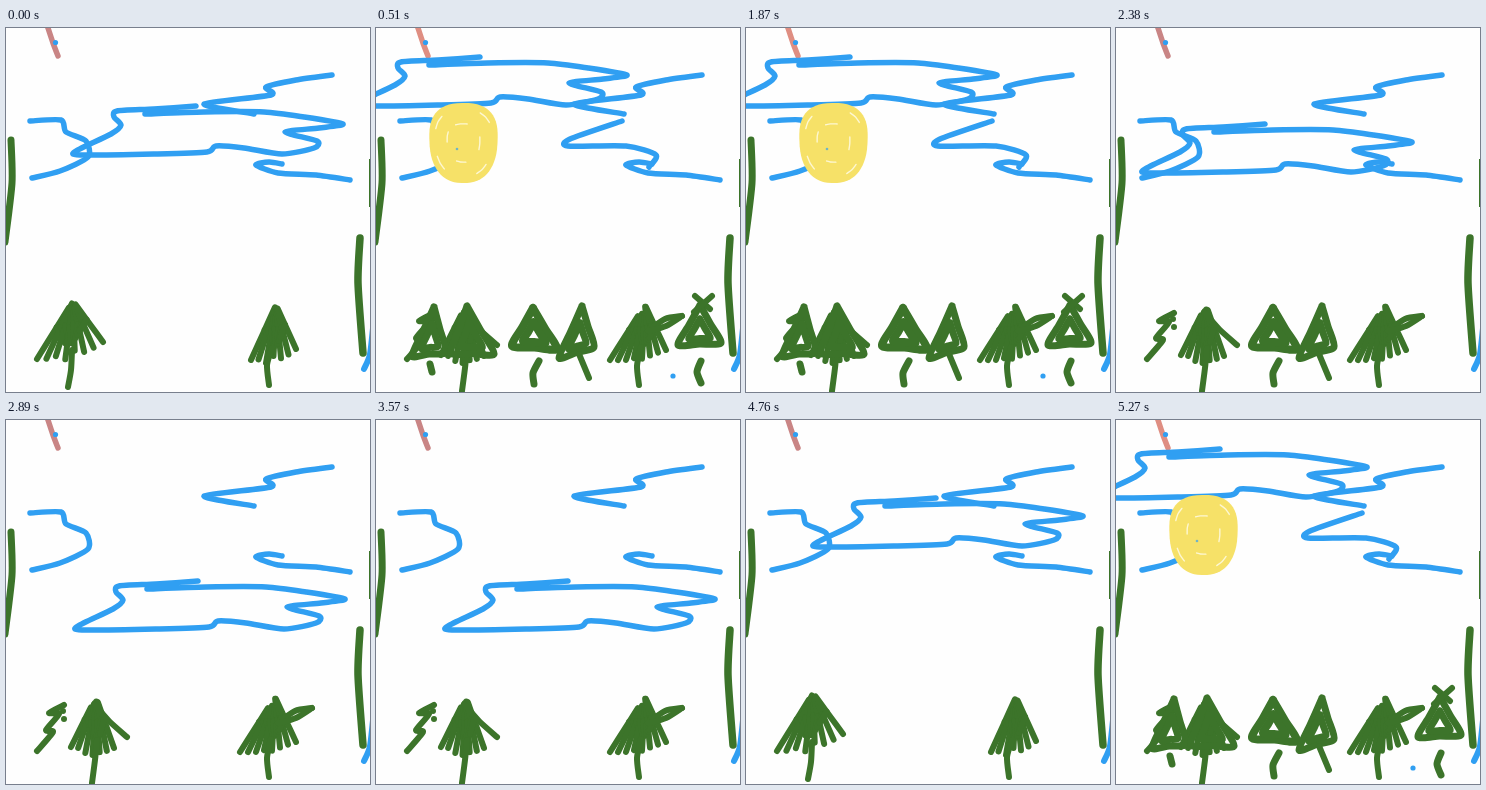
Recreate the animation shown at these times as an HTML page with a canvas. Size 364 by 364 pixels, loop 5.44 s.

```html
<!DOCTYPE html>
<html lang="en">
<head>
<meta charset="utf-8">
<title>Lake and trees</title>
<style>
html, body { margin: 0; width: 100%; height: 100%; overflow: hidden; background: #fefefe; }
canvas { display: block; width: 364px; height: 364px; }
</style>
</head>
<body>
<canvas id="stage" width="364" height="364"></canvas>
<script>
const STEP = 170, LOOP = 5440;
const BLUE = '#309ff2', GREEN = '#3c742a', YELLOW = '#f6e168', PAPER = '#fefefe';
const ctx = document.getElementById('stage').getContext('2d');

const mix = (a, b, u) => a.map((v, i) => v + (b[i] - v) * u);

function seeded(seed) {
  return () => {
    const v = Math.sin(++seed * 12.9898) * 43758.5453;
    return v - Math.floor(v);
  };
}

// Brush stroke: a smooth curve through key points.
function brush(pts, color = GREEN, width = 6) {
  const n = pts.length - 1;
  ctx.strokeStyle = color;
  ctx.lineWidth = width;
  ctx.beginPath();
  ctx.moveTo(...pts[0]);
  for (let i = 0; i < n; i++) {
    const a = pts[Math.max(i - 1, 0)], b = pts[i], c = pts[i + 1], d = pts[Math.min(i + 2, n)];
    ctx.bezierCurveTo(b[0] + (c[0] - a[0]) / 8, b[1] + (c[1] - a[1]) / 8,
      c[0] - (d[0] - b[0]) / 8, c[1] - (d[1] - b[1]) / 8, ...c);
  }
  ctx.stroke();
}

const water = pts => brush(pts, BLUE, 5.5);

function dot(x, y, r, color) {
  ctx.fillStyle = color;
  ctx.beginPath();
  ctx.arc(x, y, r, 0, 7);
  ctx.fill();
}

function cloud(x, y) {
  ctx.save();
  ctx.translate(x, y);
  water([[192, 161], [150, 164], [113, 166], [110, 172], [117, 180], [107, 189], [72, 206], [76, 210],
    [150, 209], [203, 207], [212, 201], [240, 203], [278, 209], [310, 203], [313, 196], [281, 187],
    [315, 183], [339, 179], [300, 172], [260, 167], [200, 167], [141, 169]]);
  ctx.restore();
}

function banks() {
  water([[24, 93], [55, 92], [60, 104], [80, 113], [82, 129], [54, 143], [26, 150]]);
  water([[326, 47], [290, 52], [260, 59], [265, 67], [198, 76], [248, 86]]);
  water([[276, 136], [263, 134], [250, 137], [272, 145], [310, 147], [344, 152]]);
}

const bend = () => water([[246, 93], [194, 111], [192, 118], [250, 118], [280, 127], [273, 139]]);

// A fan of strokes from the tip to a sagging base.
function fan(tip, left, right, count, seed) {
  const rnd = seeded(seed);
  for (let i = 0; i < count; i++) {
    const u = i / (count - 1);
    const end = mix(left, right, u);
    end[1] += Math.sin(u * Math.PI) * 8 * rnd();
    const from = mix(tip, end, rnd() * 0.25);
    brush([from, mix(from, end, 0.5), end]);
    const knot = mix(tip, end, 0.45);
    brush([knot, mix(knot, [tip[0], end[1]], 0.5)]);
  }
}

// Nested triangles that leave small gaps of paper.
function hut(tip, left, right, width = 7) {
  const core = mix(tip, mix(left, right, 0.5), 0.72);
  for (const k of [0, 0.5]) {
    const [t, l, r] = [tip, left, right].map(p => mix(p, core, k));
    brush([t, mix(t, l, 0.5), l, mix(l, r, 0.5), r, mix(r, t, 0.5), t], GREEN, width);
  }
}

const fir = () => {
  fan([67, 273], [31, 331], [97, 314], 8, 3);
  brush([[66, 322], [65, 342], [62, 359]]);
};

const slimFir = () => {
  fan([270, 277], [245, 332], [290, 321], 7, 5);
  brush([[266, 320], [261, 337], [263, 357]]);
};

const sprig = () => {
  brush([[58, 285], [43, 293], [53, 294], [40, 310], [47, 312], [31, 331]]);
  dot(57, 291, 3, GREEN);
  dot(58, 299, 3, GREEN);
};

const palm = () => {
  fan([90, 277], [65, 327], [108, 328], 7, 9);
  brush([[88, 284], [103, 301], [121, 317]]);
  brush([[91, 320], [89, 340], [86, 363]]);
};

const wideFir = () => {
  fan([269, 277], [234, 332], [290, 322], 8, 12);
  brush([[306, 288], [289, 291], [272, 303]]);
  brush([[306, 288], [290, 298], [272, 303]]);
  brush([[265, 319], [261, 338], [263, 357]]);
};

const pair = () => {
  hut([157, 280], [136, 318], [181, 321], 8);
  brush([[163, 333], [157, 345], [158, 356]], GREEN, 7);
  hut([206, 278], [183, 330], [218, 319]);
  brush([[203, 326], [213, 350]]);
};

const grove = () => {
  hut([58, 279], [36, 328], [70, 324]);
  hut([91, 278], [75, 325], [118, 326]);
  brush([[54, 336], [56, 344]], GREEN, 7);
  hut([324, 277], [302, 317], [345, 315], 7);
  brush([[319, 268], [334, 281]]);
  brush([[336, 268], [318, 284]]);
  brush([[325, 333], [321, 344], [325, 355]], GREEN, 7);
};

function sun() {
  const at = (a, k) => {
    const bulge = v => Math.sign(v) * Math.abs(v) ** 0.8;
    const s = Math.sin(a);
    return [87.5 + k * 34 * bulge(Math.cos(a)) * (1 - 0.1 * s), 115 + k * 40 * bulge(s)];
  };
  ctx.fillStyle = YELLOW;
  ctx.beginPath();
  for (let a = 0; a < 6.28; a += 0.1) ctx.lineTo(...at(a, 1));
  ctx.fill();
  for (let i = 0; i < 8; i++) {
    const a = 3.5 + i * 0.85, k = i % 2 ? 0.48 : 0.83;
    brush([at(a, k), at(a + 0.25, k), at(a + 0.5, k)], '#fdf7d2', 1.4);
  }
  dot(81, 121, 1.3, '#6fb4c8');
}

const poses = [
  { sky: [-2, -83], trees: [fir, slimFir] },
  { sky: [0, 0], trees: [sprig, palm, wideFir] },
  { sky: [-43, -65], trees: [sprig, palm, pair, wideFir] },
  { sky: [-88, -132], trees: [sprig, palm, pair, wideFir, grove], sunny: true }
];

function paint({ sky, trees, sunny }) {
  ctx.fillStyle = PAPER;
  ctx.fillRect(0, 0, 364, 364);
  ctx.lineCap = ctx.lineJoin = 'round';
  brush([[41, -3], [47, 15], [52, 28]], sunny ? '#df8e82' : '#c98585', 5.5);
  dot(49.5, 14.5, 2.6, BLUE);
  banks();
  if (sunny) bend();
  cloud(...sky);
  if (sunny) {
    sun();
    dot(297, 348, 2.6, BLUE);
  }
  brush([[358, 341], [364, 326], [368, 290]], BLUE);
  brush([[5, 112], [6, 155], [-1, 214]], GREEN, 7);
  brush([[354, 210], [352, 255], [357, 325]], GREEN, 7.5);
  ctx.fillStyle = GREEN;
  ctx.fillRect(363, 131, 1, 48);
  trees.forEach(tree => tree());
}

let shown = -1;
const start = performance.now();
function tick() {
  const t = (performance.now() - start) % LOOP;
  const i = Math.floor(t / STEP) % poses.length;
  if (i !== shown) paint(poses[shown = i]);
  requestAnimationFrame(tick);
}
tick();
</script>
</body>
</html>
```
